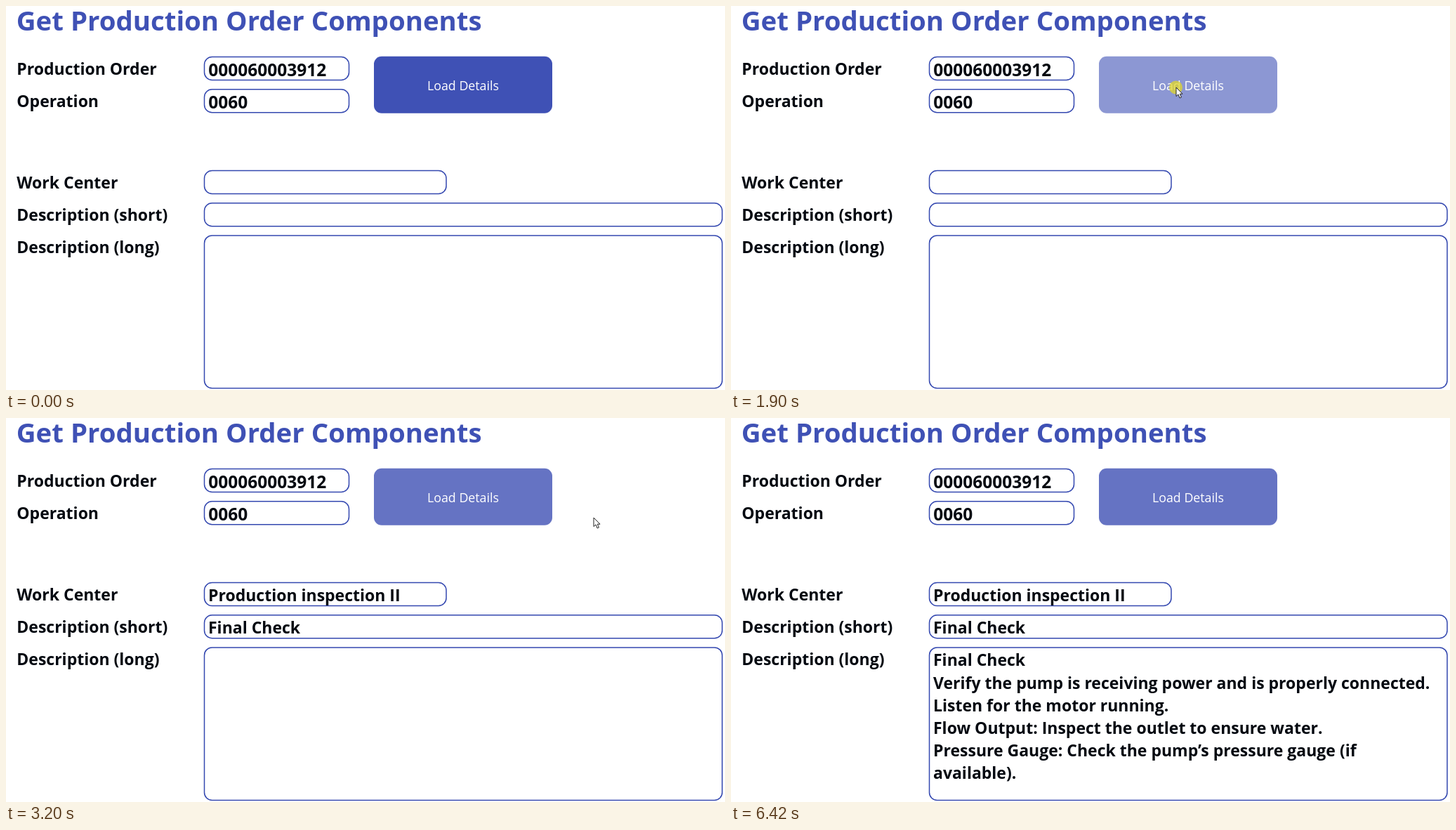
These frames come from a looping animation (1024 px wide and 547 px high, 8.5 s). An HTML page:

```html
<!DOCTYPE html>
<html lang="en">
<head>
<meta charset="utf-8">
<title>Get Production Order Components</title>
<style>
  html, body { margin: 0; width: 100%; height: 100%; overflow: hidden; background: #fff; }
  svg { display: block; width: 1024px; height: 547px; }
  text { font: 700 23px "Open Sans", "Noto Sans", sans-serif; fill: #030810; white-space: pre; }
  .title { font-size: 38.4px; fill: #3f51b5; }
  .digits { font-size: 24.5px; }
  .caption { font-size: 17.8px; font-weight: 400; fill: #fff; text-anchor: middle; }
  .field { fill: #fff; stroke: #3448b0; stroke-width: 1.5; }
</style>
</head>
<body>
<svg viewBox="0 0 1024 547">
  <clipPath id="buttonShape"><rect x="524" y="71.7" width="254" height="81" rx="11"/></clipPath>
  <text class="title" x="14.8" y="35">Get Production Order Components</text>
  <g id="form"></g>
  <g clip-path="url(#buttonShape)">
    <rect id="button" x="524" y="71" width="254" height="82"/>
    <g id="loader">
      <rect x="524" y="145" width="254" height="8" fill="#9fa8dc"/>
      <rect id="runner" y="145" width="63.5" height="8" fill="#1b2459"/>
    </g>
  </g>
  <text class="caption" x="651" y="120.3">Load Details</text>
  <g id="summary"></g>
  <g id="details"></g>
  <circle id="click" cx="633.5" cy="116" r="9.5" fill="#e1d728" fill-opacity=".75"/>
  <path id="cursor" d="M0 0V12.6L3 9.9L5.1 15L7.4 14L5.3 9.2H9Z" fill="#fff" stroke="#222" stroke-width="1" stroke-linejoin="round"/>
</svg>
<script>
const LOOP = 8500, STEP = 69;
const $ = id => document.getElementById(id);

function add(parent, tag, attrs, content = "") {
  const el = document.createElementNS("http://www.w3.org/2000/svg", tag);
  for (const name in attrs) el.setAttribute(name, attrs[name]);
  el.textContent = content;
  $(parent).append(el);
}
const write = (parent, x, y, content, cls = "") => add(parent, "text", { x, y, class: cls }, content);

// label, field top, width, height
[
  ["Production Order", 72.5, 206, 33],
  ["Operation", 118.7, 206, 33],
  ["Work Center", 234.5, 344.5, 33],
  ["Description (short)", 280.7, 737.5, 33],
  ["Description (long)", 326.9, 737.5, 217.6]
].forEach(([label, y, width, height]) => {
  write("form", 15.3, y + 25.1, label);
  add("form", "rect", { class: "field", x: 282.5, y, width, height, rx: 11 });
});
write("form", 288.3, 99.5, "000060003912", "digits");
write("form", 288.3, 145.5, "0060", "digits");

write("summary", 288, 261, "Production inspection II");
write("summary", 288, 307, "Final Check");
write("details", 288, 353.3, "Final Check");
[
  "Verify the pump is receiving power and is properly connected.",
  "Listen for the motor running.",
  "Flow Output: Inspect the outlet to ensure water.",
  "Pressure Gauge: Check the pump’s pressure gauge (if",
  "available)."
].forEach((line, i) => write("details", 288, 386.3 + 32 * i, line));

const easeOut = p => 1 - (1 - p) ** 1.35;
const easeIn = p => p ** 1.4;
const smooth = p => p * p * (3 - 2 * p);

// time, x, y, easing towards the next point
const path = [
  [260, 948, 511, easeOut],
  [1020, 655.5, 157, p => p],
  [1090, 646, 136, easeOut],
  [1430, 634, 116, p => 0],
  [2050, 634, 116, smooth],
  [2600, 837, 142, p => 0],
  [5740, 837, 142, easeIn],
  [6420, 992, 549, p => 0]
];

function cursorAt(t) {
  let i = path.findLastIndex(point => point[0] <= t);
  i = Math.max(0, Math.min(i, path.length - 2));
  const [t0, x0, y0, ease] = path[i], [t1, x1, y1] = path[i + 1];
  const p = ease(Math.max(0, Math.min(1, (t - t0) / (t1 - t0))));
  return [x0 + (x1 - x0) * p, y0 + (y1 - y0) * p];
}

const show = (id, on) => $(id).setAttribute("visibility", on ? "visible" : "hidden");

function draw(now) {
  const t = now % LOOP;
  const held = 260 + Math.floor((t - 260) / STEP) * STEP;
  const pressed = t >= 1900 && t < 2030;
  const loading = t >= 2445 && t < 3200;

  $("button").setAttribute("fill",
    t < 1090 ? "#3f51b5" : pressed ? "#8c97d3" : loading ? "#6874bc" : "#6573c3");
  show("loader", loading);
  $("runner").setAttribute("x", 460.5 + 318 * (t - 2445) / 700);
  show("click", pressed);
  show("summary", t >= 3200);
  show("details", t >= 4260);

  show("cursor", t >= 260 && t < 6420);
  $("cursor").setAttribute("transform", `translate(${cursorAt(held)})`);
  requestAnimationFrame(draw);
}
requestAnimationFrame(draw);
</script>
</body>
</html>
```
